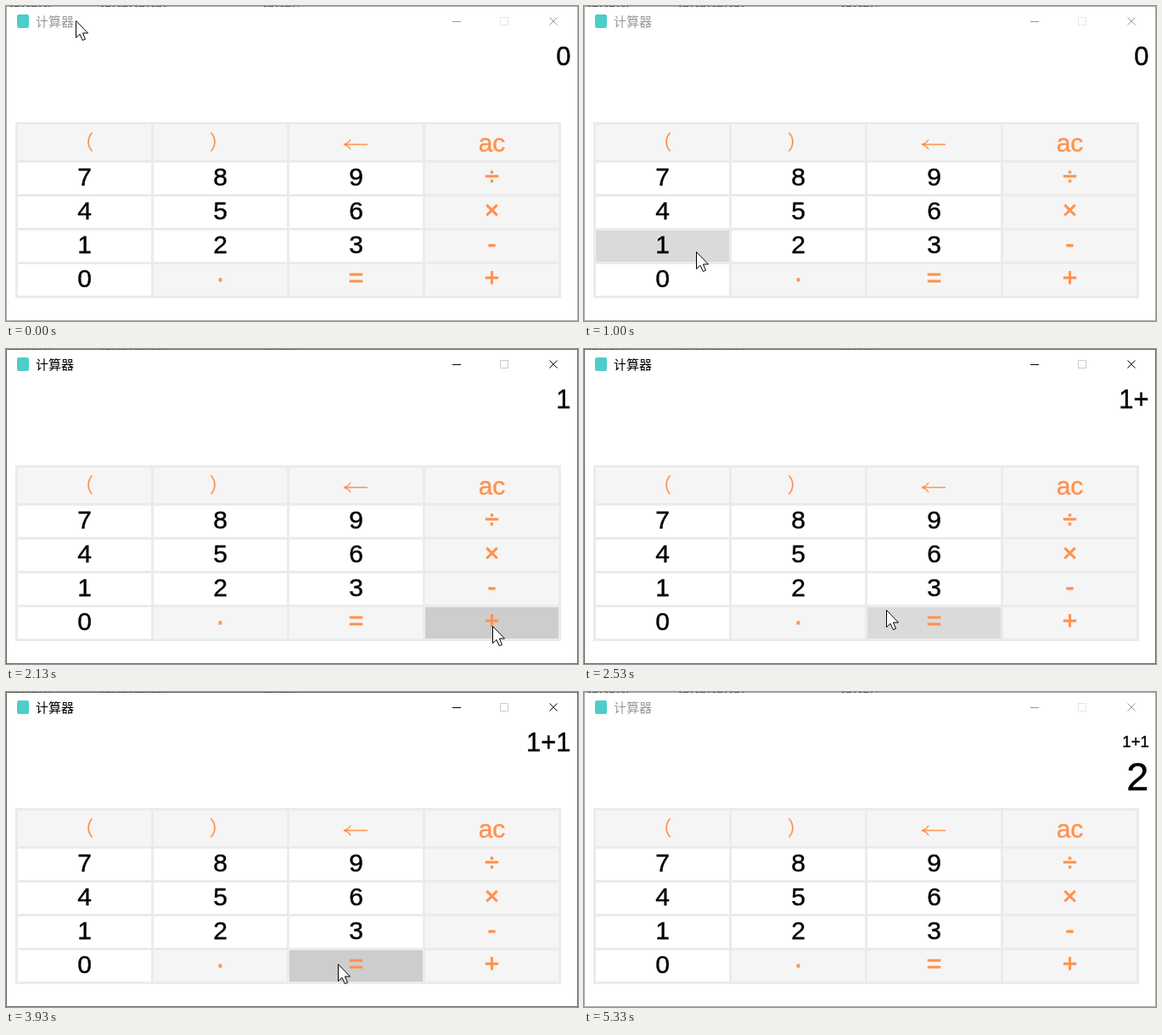
Write an HTML page that moves like this. It is 674 px wide and 372 px high and loops after 5470 ms.

```html
<!DOCTYPE html>
<html lang="zh">
<head>
<meta charset="utf-8">
<style>
html, body { margin: 0; width: 100%; height: 100%; overflow: hidden; background: #fff; }
svg { display: block; width: 674px; height: 372px; font-family: "Liberation Sans", Arial, sans-serif; }
.cjk { font-family: "Noto Sans CJK SC", "Noto Sans CJK", sans-serif; }
.key { font-size: 30px; text-anchor: middle; stroke: #000; stroke-width: .4; }
.op { fill: #ff914d; stroke: #ff914d; }
.sign { stroke-width: .9; }
.paren { font-size: 24px; font-weight: 300; stroke: none; }
.out { text-anchor: end; stroke: #000; stroke-width: .4; }
</style>
</head>
<body>
<svg viewBox="0 0 674 372">
  <rect id="frame" x=".5" y=".5" width="673" height="371" fill="#fff"/>
  <path d="M5 .5H52M112 .5H190M304 .5H345" stroke="#555" stroke-dasharray="3 2 6 3 2 4"/>
  <rect x="13" y="10" width="14" height="16" rx="2" fill="#4ecdc9"/>
  <g id="bar">
    <text class="cjk" x="35" y="23.5" font-size="15">计算器</text>
    <path d="M526 18.5h10M640.5 13.5l9 9M649.5 13.5l-9 9" fill="none" stroke="currentColor"/>
  </g>
  <rect id="max" x="582.5" y="13.5" width="9" height="9" fill="none"/>
  <text id="main" class="out" x="665.5" y="70" font-size="31"></text>
  <text id="small" class="out" x="666" y="65" font-size="18.7"></text>
  <text id="big" class="out" x="665.5" y="116" font-size="47"></text>
  <rect x="11" y="137" width="643" height="208" fill="#ebebeb"/>
  <g id="keys"></g>
  <path id="cursor" d="M.5 .5V20.5L5 16.3 8.3 23.5 11.5 22.2 8.4 15H14.5Z" fill="#fff" stroke="#000"/>
</svg>
<script>
const LOOP = 5470;
const $ = id => document.getElementById(id);

function add(tag, attrs, text = '') {
  const el = document.createElementNS('http://www.w3.org/2000/svg', tag);
  for (const k in attrs) el.setAttribute(k, attrs[k]);
  el.textContent = text;
  $('keys').append(el);
  return el;
}

function addLabel(label, mid, y) {
  if (label === '←')
    add('path', { d: 'M426 163.5H399M406 157.5Q404 162 398 163.5Q404 165 406 169.5',
      fill: 'none', stroke: '#ff914d', 'stroke-width': 1.3 });
  else if ('（）'.includes(label))
    add('text', { class: 'key op cjk paren', x: mid - 1, y: y + 29.3 }, label);
  else if (label === 'ac')
    add('text', { class: 'key op', x: mid, y: y + 32 }, label);
  else if (label >= '0' && label <= '9')
    add('text', { class: 'key', x: mid, y: y + 27 }, label);
  else
    add('text', { class: 'key op sign', x: mid, y: y + 26 }, label);
}

const keys = '（ ） ← ac 7 8 9 ÷ 4 5 6 × 1 2 3 - 0 · = +'.split(' ').map((label, i) => {
  const col = i % 4, row = (i - col) / 4;
  const x = 14 + 160 * col, y = row ? 145 + 40 * row : 140, h = row ? 37 : 42;
  const fill = row && label >= '0' && label <= '9' ? '#fff' : '#f5f5f5';
  const rect = add('rect', { x, y, width: 157, height: h });
  addLabel(label, x + 78.5, y);
  return { x, y, h, fill, rect };
});

// pointer moves: first tick, last tick, goal x, goal y
const moves = [
  [0, 6, 17, 323], [6, 8, 24, 336], [9, 15, 132, 290], [19, 29, 573, 327],
  [34, 42, 138, 289], [45, 51, 391, 321], [64, 70, 215, 376]
];

function pointer(n) {
  let x = 82, y = 17;
  for (const [from, to, gx, gy] of moves) {
    const k = Math.min(1, Math.max(0, (n - from) / (to - from)));
    const ease = k * k * (3 - 2 * k);
    x += (gx - x) * ease;
    y += (gy - y) * ease;
  }
  return [Math.round(x), Math.round(y)];
}

function draw(t) {
  // screen ticks at 15 per second, snapped to 10 ms
  const n = Math.floor((Math.floor(t / 10) + .5) * .15);
  const [px, py] = pointer(n);
  const pressed = [18, 32, 33, 44, 59].includes(n);
  const active = n >= 18 && n < 80;
  const ink = active ? '#000' : '#999';

  $('frame').setAttribute('stroke', active ? '#6d6d6d' : '#aaa');
  $('bar').setAttribute('fill', ink);
  $('bar').setAttribute('color', ink);
  $('max').setAttribute('stroke', active ? '#ccc' : '#e6e6e6');

  const done = n >= 60;
  $('main').textContent = done ? '' : n < 19 ? '0' : '1+1'.slice(0, n < 34 ? 1 : n < 45 ? 2 : 3);
  $('small').textContent = done ? '1+1' : '';
  $('big').textContent = done ? '2' : '';

  for (const k of keys) {
    const over = px >= k.x && px < k.x + 157 && py >= k.y && py < k.y + k.h;
    k.rect.setAttribute('fill', over ? (pressed ? '#cdcdcd' : '#dadada') : k.fill);
  }
  $('cursor').setAttribute('transform', `translate(${px} ${py})`);
}

const start = performance.now();
function loop() {
  draw((performance.now() - start) % LOOP);
  requestAnimationFrame(loop);
}
loop();
</script>
</body>
</html>
```
